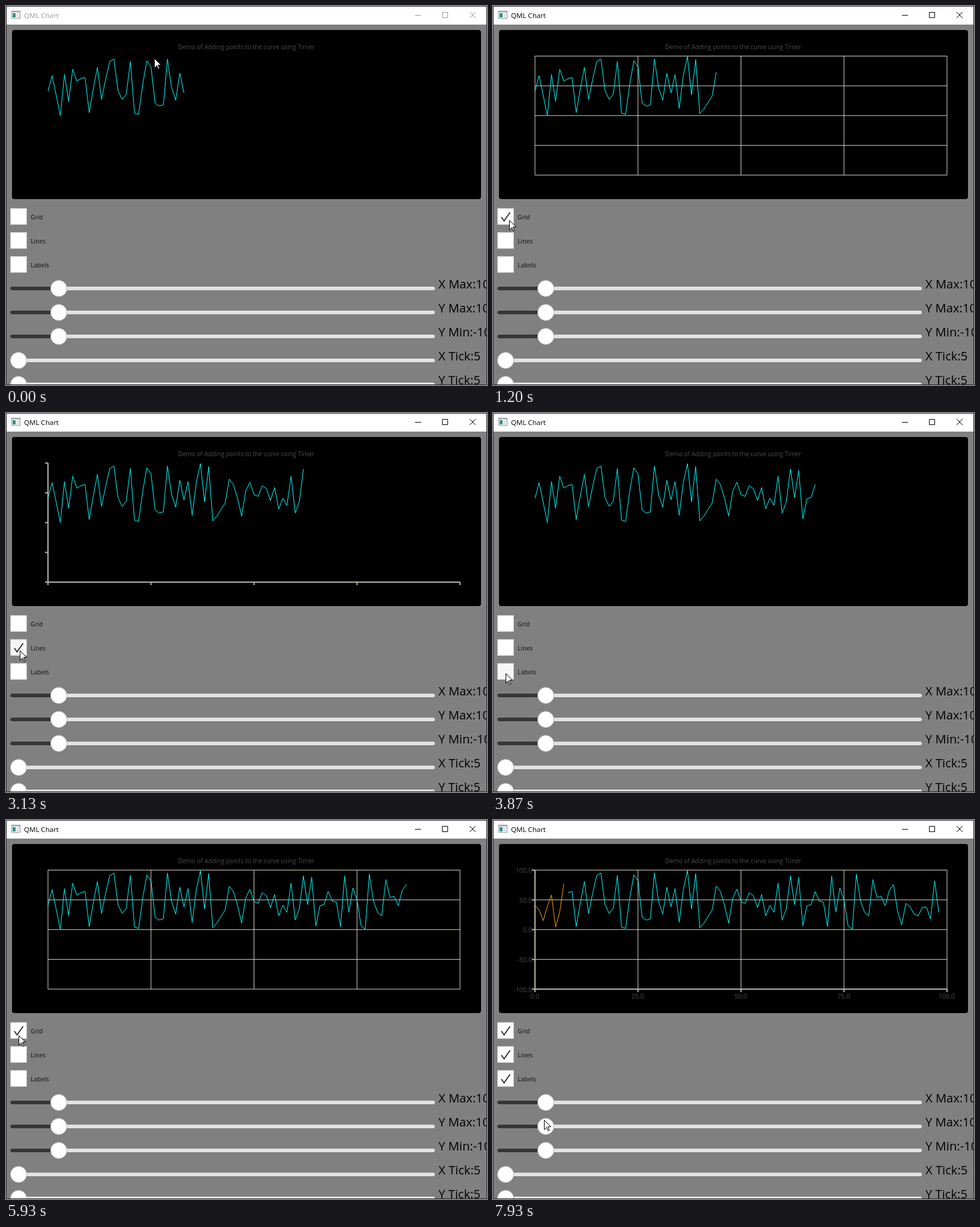
Write an HTML page that moves like this. It is 802 by 632 pixels and loops after 8000 ms.

```html
<!DOCTYPE html>
<html lang="en">
<head>
<meta charset="utf-8">
<title>QML Chart</title>
<style>
  html, body { margin: 0; width: 802px; height: 632px; overflow: hidden; background: #808080; }
  svg { display: block; font-family: "Open Sans", "Noto Sans", sans-serif; }
  path, polyline { fill: none; }
  .dim { fill: #4c4c4c; font-size: 10.7px; }
  .option { fill: #2c2c2c; font-size: 10px; font-weight: 600; }
  .value { fill: #000; font-size: 20.2px; }
</style>
</head>
<body>
<svg id="stage" width="802" height="632" viewBox="0 0 802 632"></svg>
<script>
const LOOP = 8000, STEP = 109, COUNT = 99, PRESS = 190;
const LEFT = 70, RIGHT = 757, TOP = 83.5, BOTTOM = 282;

// Chart units (x 0..100, y -100..100) to pixels
const px = x => LEFT + (RIGHT - LEFT) * x / 100;
const py = y => BOTTOM - (BOTTOM - TOP) * (y + 100) / 200;

// Linear congruential generator, two passes of the curve in one stream
let seed = 1;
function random() {
  seed = (Math.imul(seed, 214013) + 2531011) | 0;
  return (seed >>> 16) & 0x7fff;
}
const samples = Array.from({ length: 2 * COUNT }, () => random() % 100);

// When each box is switched: on, off, on
const options = [
  { name: 'Grid', toggles: [1070, 1950, 5750] },
  { name: 'Lines', toggles: [2600, 3250, 6480] },
  { name: 'Labels', toggles: [4060, 4990, 6950] }];

// Where the pointer rests: arrival, departure, x, y
const rests = [
  [0, 130, 247, 87], [850, 2000, 27, 357], [2400, 3450, 23, 396], [3800, 5050, 21, 434],
  [5680, 6000, 21, 359], [6320, 6600, 18, 388], [6850, 7200, 17, 428], [7750, LOOP, 85, 500]];

const rect = (x, y, w, h, fill, extra = '') =>
  `<rect x="${x}" y="${y}" width="${w}" height="${h}" fill="${fill}" ${extra}/>`;
const text = (x, y, s, cls, anchor = 'start', extra = '') =>
  `<text x="${x}" y="${y}" class="${cls}" text-anchor="${anchor}" ${extra}>${s}</text>`;
const ticks = mark => [0, 25, 50, 75, 100].map(v => mark(v, 2 * v - 100)).join('');

const titleBar = rect(0, 0, 802, 31, '#fff') +
  rect(9.5, 8.5, 14, 12, '#fff', 'stroke="#8a8f94"') + rect(10, 9, 13, 2, '#b9c0c6') +
  rect(11, 12, 5, 7, '#2f8f86') + rect(17, 12, 5, 7, '#dfe3e6') +
  `<g id="caption">${text(30, 20, 'QML Chart', '', 'start', 'font-size="11.54"')}</g>
  <path id="buttons" d="M682 15.5h10M727.5 10.5h9v9h-9zM773 10l10 10M783 10l-10 10"/>`;

const chart = rect(10, 40, 782, 282, '#000', 'rx="4"') +
  text(400.5, 72, 'Demo of Adding points to the curve using Timer', 'dim', 'middle', 'style="font-size:10.2px"') +
  `<path id="Grid" stroke="#d6d6c8" d="${
    ticks((x, y) => `M${LEFT} ${py(y)}H${RIGHT}M${px(x)} ${TOP}V${BOTTOM}`)}"/>
  <path id="Lines" stroke="#b4b4aa" stroke-width="2" d="M${LEFT} ${TOP}V${BOTTOM}H${RIGHT}${
    ticks((x, y) => `M${LEFT} ${py(y)}h-5M${px(x)} ${BOTTOM}v5`)}"/>
  <g id="Labels">${ticks((x, y) =>
    text(65, py(y) + 4.5, y.toFixed(1), 'dim', 'end') +
    text(px(x) - .5, 298, x.toFixed(1), 'dim', 'middle'))}</g>
  <polyline id="cyan" stroke="#0ff"/><polyline id="orange" stroke="#ffa500"/>`;

const boxes = options.map(({ name }, i) => {
  const y = 337 + 40 * i;
  return rect(7.5, y + .5, 27, 27, '#fff', `stroke="#bdbdbd" id="box${name}"`) +
    `<path id="check${name}" d="M13.8 ${y + 15}l4.7 6.3L28.5 ${y + 7}" stroke="#353637" stroke-width="2"/>` +
    text(41, y + 18.5, name, 'option');
}).join('');

const sliders = ['X Max:100', 'Y Max:100', 'Y Min:-100', 'X Tick:5', 'Y Tick:5'].map((label, i) => {
  const x = label.includes('Tick') ? 21 : 88, y = 471 + 40 * i;
  return rect(7, y - 3, 708, 6, '#e3e3e3', 'rx="3"') + rect(7, y - 3, x - 7, 6, '#353637', 'rx="3"') +
    `<circle cx="${x}" cy="${y}" r="13.5" fill="#fff" stroke="#bdbdbd"/>` + text(721, y, label, 'value');
}).join('');

const $ = id => document.getElementById(id);
$('stage').innerHTML = rect(0, 0, 802, 632, '#808080') + titleBar + chart + boxes + sliders +
  rect(.5, .5, 801, 631, 'none', 'stroke="#2b2b2b"') +
  '<path id="pointer" d="M.5 .5V16.5L4.5 12.5L7 18.5L9 17.5L6.5 11.5H11.5Z" style="fill:#fff" stroke="#000"/>';

// Points of one pass, from one index up to another
const points = (pass, from, to) => samples.slice(pass * COUNT + from, pass * COUNT + to)
  .map((v, i) => `${px(from + i).toFixed(2)},${py(v).toFixed(2)}`).join(' ');
const show = (id, on) => $(id).setAttribute('visibility', on ? 'visible' : 'hidden');

function pointerAt(t) {
  const k = rests.findIndex(r => r[1] > t);
  const [arrive, , x, y] = rests[k];
  if (t >= arrive) return [x, y];
  const [, leave, x0, y0] = rests[k - 1];
  const u = (t - leave) / (arrive - leave), e = u * u * (3 - 2 * u);
  return [Math.round(x0 + (x - x0) * e), Math.round(y0 + (y - y0) * e)];
}

function draw(t) {
  const ink = t < 130 ? '#999' : '#000';
  $('caption').setAttribute('fill', ink);
  $('buttons').setAttribute('stroke', ink);

  for (const { name, toggles } of options) {
    const on = toggles.filter(s => s <= t).length % 2 === 1;
    const down = toggles.some(s => t >= s - PRESS && t < s);
    show(name, on);
    show('check' + name, on);
    $('box' + name).setAttribute('fill', down ? '#f6f6f6' : '#fff');
  }

  // The second pass overwrites the first from the left
  const total = Math.floor(34.48 + t / STEP);
  const redrawn = Math.max(0, total - COUNT);
  $('cyan').setAttribute('points', points(0, redrawn, Math.min(total, COUNT)));
  $('orange').setAttribute('points', points(1, 0, redrawn));
  $('pointer').setAttribute('transform', `translate(${pointerAt(t)})`);
}

const start = performance.now();
function frame() {
  draw((performance.now() - start) % LOOP);
  requestAnimationFrame(frame);
}
frame();
</script>
</body>
</html>
```
